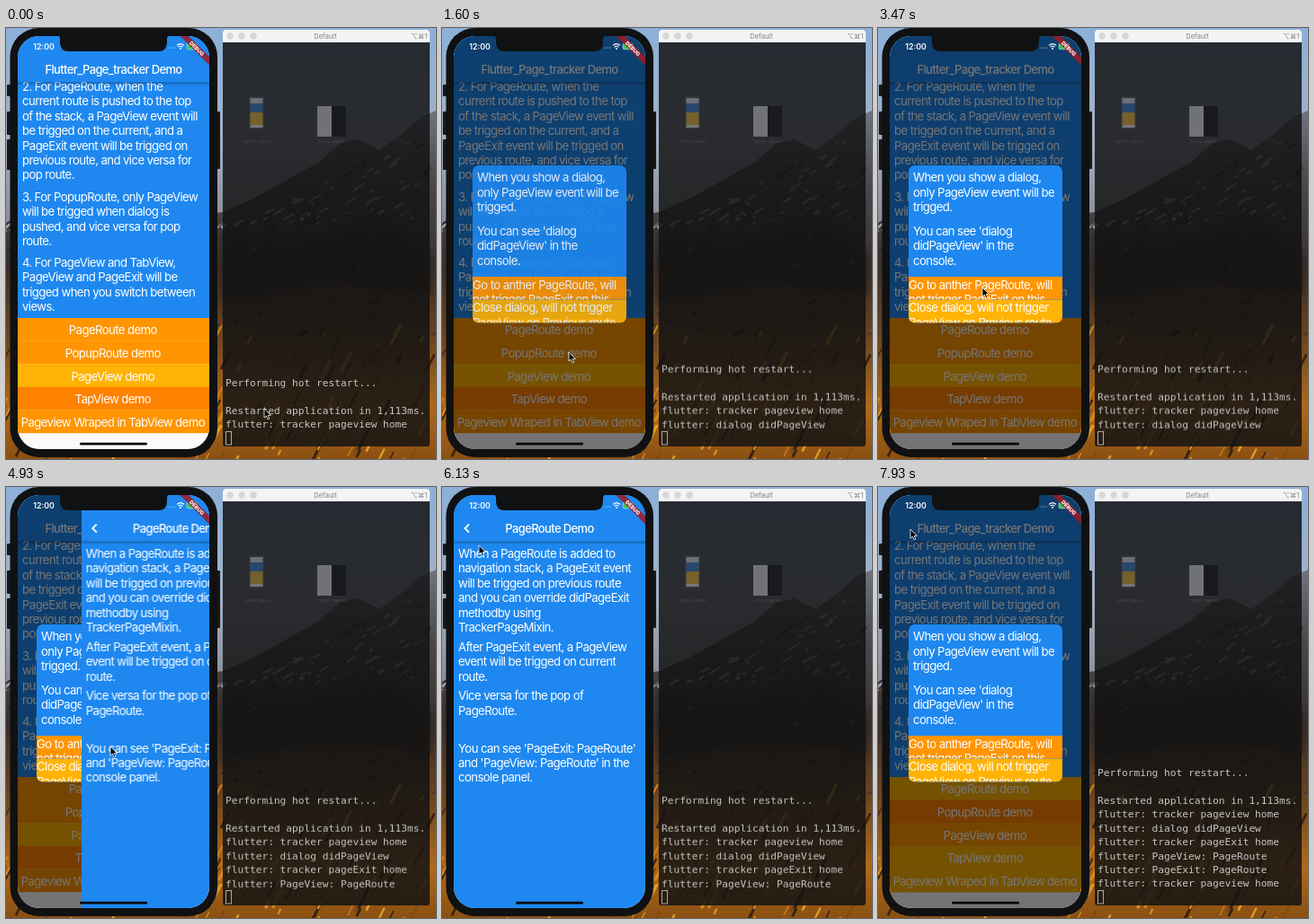
These frames come from a looping animation (478 by 480 pixels, 8000 ms). An HTML page:

```html
<!DOCTYPE html>
<html lang="en">
<head>
<meta charset="utf-8">
<title>Page tracker demo</title>
<style>
  html, body { margin: 0; width: 100%; height: 100%; overflow: hidden; background: #222; }
  svg { display: block; }
  text { font-family: Inter, "Open Sans", sans-serif; fill: #fff; }
  .body { font-size: 13.2px; letter-spacing: -.6px; }
  .title { font-size: 13px; font-weight: 500; letter-spacing: -.62px; }
  .clock { font-size: 8.8px; font-weight: 600; }
  .debug { font-size: 5.8px; font-weight: 800; }
  .log { font: 11.2px "DejaVu Sans Mono", monospace; fill: #c6c6c6; }
  .bar { font: 7.5px Inter, "DejaVu Sans", sans-serif; fill: #808080; }
  .label { font-size: 4px; fill: #777; opacity: .4; }
  .mid { text-anchor: middle; }
</style>
</head>
<body>
<svg id="stage" width="478" height="480" viewBox="0 0 478 480"></svg>
<script>
const LOOP = 8000;
const BLUE = '#1e88f0', ORANGE = '#ff9500', AMBER = '#ffb305', DEEP = '#ff8200';
const ROW = 25.6, LEADING = 16.4, LOG_LEADING = 15.4;

const rect = (x, y, w, h, fill, extra = '') =>
  `<rect x="${x}" y="${y}" width="${w}" height="${h}" fill="${fill}" ${extra}/>`;
const text = (x, y, cls, value) => `<text x="${x}" y="${y}" class="${cls}">${value}</text>`;
const lines = (x, y, value, cls = 'body', leading = LEADING) =>
  value.split('|').map((line, i) => text(x, y + i * leading, cls, line)).join('');
const crop = (x, y, w, h, content) =>
  `<svg x="${x}" y="${y}" width="${w}" height="${h}" viewBox="${x} ${y} ${w} ${h}">${content}</svg>`;
const gradient = (id, stops) => `<linearGradient id="${id}" x2="0" y2="1">` +
  stops.map(([at, color, alpha = 1]) => `<stop offset="${at}" stop-color="${color}" stop-opacity="${alpha}"/>`).join('') +
  '</linearGradient>';
const header = title => rect(13, 9, 213, 51.5, BLUE) + rect(13, 60.5, 213, 3.5, 'url(#shade)') +
  text(119.5, 50.8, 'title mid', title);

let seed = 7;
const random = () => (seed = seed * 16807 % 2147483647) / 2147483647;

// Short slanted strokes that give the slopes their grain
const grain = (count, top, bottom, lean, colors) => Array.from({ length: count }, () => {
  const x = random() * 478, y = top(x) + random() * (bottom - top(x)), run = 3 + random() * 9;
  const color = colors[Math.floor(random() * colors.length)];
  return `<path d="M${x.toFixed(1)} ${y.toFixed(1)}l${(-run).toFixed(1)} ${(run * lean).toFixed(1)}" stroke="${color}" stroke-width="${(1 + random() * 2.5).toFixed(1)}"/>`;
}).join('');

const defs = `<defs>
  ${gradient('sky', [[0, '#8db0d8'], [.25, '#a3b1c4'], [.5, '#85858f'], [1, '#3a3030']])}
  ${gradient('rock', [[0, '#70747e'], [.2, '#4b4a50'], [.45, '#3a302c'], [.65, '#6b4520'], [.85, '#b06a1c'], [1, '#8a5012']])}
  ${gradient('shade', [[0, '#000', .3], [1, '#000', 0]])}
  <clipPath id="screen"><rect x="13" y="9" width="213" height="460" rx="24"/></clipPath>
  <clipPath id="card"><rect x="34" y="153" width="171" height="175.5" rx="7"/></clipPath>
  <filter id="soft"><feGaussianBlur stdDeviation="5"/></filter>
</defs>`;

const ridge = x => 225 - Math.max(0, x - 241) * .5;
const wallpaper = rect(0, 0, 478, 480, 'url(#sky)') +
  `<path fill="url(#rock)" d="M0 225L60 210L150 220L241 205L275 190L297 178L325 162L347 150L372 128L392 124L415 136L440 118L460 100L478 92V480H0Z"/>
  <g filter="url(#soft)">
    <path fill="#17181c" opacity=".5" d="M241 225L320 240L420 215L471 250V300L350 285L241 310Z"/>
    <path fill="#5e3a22" opacity=".6" d="M290 330L380 290L471 300L420 345Z"/>
  </g>
  ${grain(190, ridge, 215, .6, ['#a9abb4', '#8f929c', '#2c2d33', '#3a3a40'])}
  ${grain(130, () => 215, 340, .5, ['#211c1b', '#4c3a30', '#6a4526', '#302a28'])}
  ${grain(170, () => 330, 480, 2, ['#d58a1e', '#e09c2a', '#3a2410', '#7a4716'])}`;

const log = 'Performing hot restart...||Restarted application in 1,113ms.|flutter: tracker pageview home|' +
  'flutter: dialog didPageView|flutter: tracker pageExit home|flutter: PageView: PageRoute|' +
  'flutter: PageExit: PageRoute|flutter: tracker pageview home';

const terminal = rect(241, 2, 230, 464, '#131313', 'opacity=".84" rx="3"') +
  `<g opacity=".42">
    ${rect(270, 76, 17, 37, '#3b3f45')}${rect(271.5, 78, 14, 6, '#c6ced6')}
    ${rect(271.5, 84, 14, 10, '#2a6ec0')}${rect(271.5, 94, 14, 14, '#e0ac2c')}${rect(271.5, 108, 14, 3, '#ddd')}
    ${rect(346, 87, 16, 34, '#d5d5d5')}${rect(362, 87, 16, 34, '#050505')}
  </g>` +
  text(279, 128, 'label mid', 'Screen Capture') + text(362, 128, 'label mid', 'Screen Capture') +
  rect(241, 2, 230, 14, '#f4f4f4', 'rx="3"') + rect(241, 10, 230, 6, '#f4f4f4') +
  [249, 262, 275].map(x => `<circle cx="${x}" cy="9" r="3.4" fill="#d8d8d8" stroke="#c8c8c8" stroke-width=".5"/>`).join('') +
  text(355, 11.8, 'bar mid', 'Default') + text(450, 11.8, 'bar', '⌥⌘1') +
  crop(241, 16, 230, 433, `<g id="log">${lines(244, 399.2, log, 'log', LOG_LEADING)}</g>`) +
  '<rect x="244.5" y="449.5" width="6" height="14.5" fill="none" stroke="#a8a8a8"/>';

const rows = (id, colors) => `<g id="${id}">` +
  colors.map((c, i) => rect(13, 323 + i * ROW, 213, ROW + .2, c)).join('') + '</g>';

const home = rect(13, 9, 213, 460, '#fafafa') + rect(13, 9, 213, 314.2, BLUE) +
  lines(18, 70, '2. For PageRoute, when the|current route is pushed to the top|of the stack, a PageView event will|be trigged on the current, and a|PageExit event will be trigged on|previous route, and vice versa for|pop route.') +
  lines(18, 192.7, '3. For PopupRoute, only PageView|will be trigged when dialog is|pushed, and vice versa for pop|route.') +
  lines(18, 266, '4. For PageView and TabView,|PageView and PageExit will be|trigged when you switch between|views.') +
  header('Flutter_Page_tracker Demo') +
  rows('rows', [ORANGE, ORANGE, AMBER, DEEP, ORANGE]) +
  rows('rebuiltRows', [AMBER, DEEP, ORANGE, AMBER, AMBER]) +
  lines(118.8, 341.4, 'PageRoute demo|PopupRoute demo|PageView demo|TapView demo|Pageview Wraped in TabView demo', 'body mid', ROW);

const dialog = `<g id="barrier">${rect(13, 9, 213, 460, '#000', 'opacity=".54"')}</g>
  <g id="dialog"><g clip-path="url(#card)">${rect(34, 153, 171, 176, BLUE)}
  ${lines(39, 171.4, 'When you show a dialog,|only PageView event will be|trigged.')}
  ${lines(39, 231, "You can see 'dialog|didPageView' in the|console.")}
  ${crop(34, 277, 171, 25.6, rect(34, 277, 171, 26, ORANGE) + lines(34, 290.6, 'Go to anther PageRoute, will|not trigger PageExit on this'))}
  ${crop(34, 302.6, 171, 26, rect(34, 302.6, 171, 26, AMBER) + lines(34, 316.2, 'Close dialog, will not trigger|PageView on Previous route'))}
  </g></g>`;

const page = `<g id="page">${rect(13, 9, 213, 460, BLUE)}${header('PageRoute Demo')}
  <circle id="ripple" cx="29" cy="46" r="13.6" fill="#bcbcbc" fill-opacity=".16"/>
  <path d="M30 41.5L25.5 46L30 50.5" fill="none" stroke="#fff" stroke-width="1.8"/>
  ${lines(18, 79, 'When a PageRoute is added to|navigation stack, a PageExit event|will be trigged on previous route|and you can override didPageExit|methodby using|TrackerPageMixin.')}
  ${lines(18, 182.7, 'After PageExit event, a PageView|event will be trigged on current|route.')}
  ${lines(18, 237.4, 'Vice versa for the pop of|PageRoute.')}
  ${lines(18, 295.6, "You can see 'PageExit: PageRoute'|and 'PageView: PageRoute' in the|console panel.")}
  </g>`;

const statusBar = text(42, 23.8, 'clock mid', '12:00') +
  [181, 183, 185, 187].map(x => `<circle cx="${x}" cy="22" r=".6" fill="#fff" opacity=".7"/>`).join('') +
  `<g fill="none" stroke="#fff" stroke-width="1.2"><path d="M190 19.4Q194 15.9 198 19.4M191.6 21.3Q194 19.2 196.4 21.3"/></g>
  <circle cx="194" cy="23" r="1" fill="#fff"/>` +
  rect(201, 17.2, 11.5, 6.6, '#35c759', 'rx="1.6" stroke="#cfe3f6" stroke-width=".6"') +
  `<g transform="translate(226 9) rotate(45)">${rect(-32, 16.2, 64, 6.8, '#a01c24', 'opacity=".85"')}
  ${text(0, 21.8, 'debug mid', 'DEBUG')}</g>`;

const phone = [[1, 63, 13], [1, 93, 26], [1, 124, 34]].map(([x, y, h]) => rect(x, y, 6, h, '#17181a', 'rx="1"')).join('') +
  rect(233, 93, 5, 64, '#17181a', 'rx="1"') +
  rect(4.5, 0, 230.5, 478, '#101112', 'rx="32"') +
  `<g clip-path="url(#screen)">${home}${dialog}${page}${statusBar}
  ${rect(82, 461.8, 75, 2.8, '#050505', 'rx="1.4"')}</g>
  <path fill="#101112" d="M57 8H182Q179 9 179 12V16Q179 26 169 26H70Q60 26 60 16V12Q60 9 57 8Z"/>`;

const pointer = `<path id="pointer" fill="#000" stroke="#fff" stroke-width=".8" stroke-linejoin="round"
  d="M0 0V10.2L2.4 8L4 11.8L5.8 11L4.2 7.4H7.4Z"/>`;

document.getElementById('stage').innerHTML = defs + wallpaper + terminal + phone + pointer;

// Each step: [ms, value, easing towards the next step]
function loop(id, property, steps) {
  const last = steps[steps.length - 1];
  const frames = [...steps, [LOOP, last[1]]].map(([ms, value, easing = 'linear']) =>
    ({ offset: ms / LOOP, [property]: value, easing }));
  document.getElementById(id).animate(frames, { duration: LOOP, iterations: Infinity });
}
const at = (x, y) => `translate(${x}px, ${y}px)`;
const SLIDE = 'cubic-bezier(.35,.91,.33,.97)', HOLD = 'step-end', EASE = 'ease-in-out';

loop('log', 'transform', [[0, 0], [1480, 1], [4800, 3], [7170, 5]].map(
  ([ms, count]) => [ms, at(0, -count * LOG_LEADING), HOLD]));
loop('barrier', 'opacity', [[0, 0], [1480, 0, 'ease'], [1610, 1]]);
loop('dialog', 'opacity', [[0, 0], [1490, 0, 'ease-out'], [1640, 1]]);
loop('page', 'transform', [[0, at(214, 0)], [4822, at(214, 0), SLIDE], [5222, at(0, 0)],
  [7220, at(0, 0), SLIDE], [7620, at(214, 0)]]);
loop('ripple', 'opacity', [[0, 0], [7100, 0], [7180, 1], [7300, 1], [7500, 0]]);
loop('rebuiltRows', 'opacity', [[0, 0, HOLD], [7220, 1, HOLD]]);
loop('pointer', 'transform', [[0, at(287, 424)], [270, at(287, 424), EASE], [1200, at(141, 361)],
  [2000, at(141, 361), EASE], [2900, at(116, 289)], [5350, at(116, 289), EASE],
  [6130, at(41, 65), 'ease-out'], [6500, at(32, 43)], [7300, at(32, 43), EASE], [7700, at(36, 47)]]);
</script>
</body>
</html>
```
